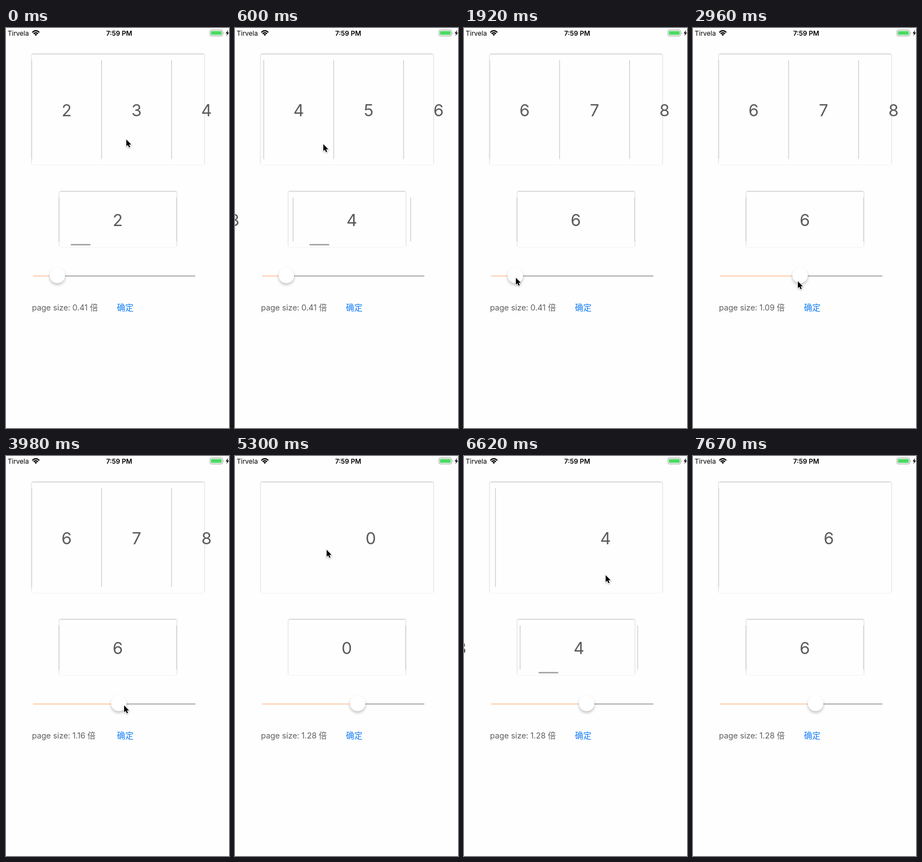
Write an HTML page that moves like this. It is 404x725 px and loops after 8.49 s.

```html
<!DOCTYPE html>
<html lang="zh">
<head>
<meta charset="utf-8">
<title>Page size</title>
<style>
html, body { margin: 0; width: 100%; height: 100%; overflow: hidden; background: #fefefe; }
#stage { position: relative; width: 404px; height: 725px; overflow: hidden; }
.box { position: absolute; background: #fefefe; border-radius: 2px; box-shadow: 0 -1px 3px rgba(0,0,0,.27); }
svg { position: absolute; left: 0; top: 0; font-family: Inter, "Noto Sans CJK SC", "Noto Sans CJK", sans-serif; }
.num { font-size: 30px; fill: #5a5a5a; text-anchor: middle; }
.sep { fill: #d2d2d2; }
.label { font-size: 14.6px; letter-spacing: -.13px; fill: #606060; }
.link { font-size: 15px; fill: #127cf5; }
.bar { font-size: 12px; }
#knob { filter: drop-shadow(0 3px 2.5px rgba(0,0,0,.24)); }
#cursor { filter: drop-shadow(0 1px 1px rgba(0,0,0,.3)); }
</style>
</head>
<body>
<div id="stage">
  <div class="box" style="left:47px;top:48px;width:312px;height:200px"></div>
  <div class="box" style="left:97px;top:297px;width:212px;height:100px"></div>
  <svg width="404" height="725" viewBox="0 0 404 725">
    <g class="bar">
      <text x="3" y="14">Tirvela</text>
      <text x="205" y="14" text-anchor="middle" font-weight="600">7:59 PM</text>
    </g>
    <path d="M47.6 7.9Q54 2 60.4 7.9M50 10.4Q54 6.7 58 10.4" fill="none" stroke="#000" stroke-width="2.1"/>
    <path d="M54 14.2L51.6 11.8Q54 9.8 56.4 11.8Z"/>
    <rect x="369.5" y="3.5" width="23" height="11" rx="2.6" fill="none" stroke="#a0a0a0"/>
    <rect x="371.2" y="5.4" width="19.6" height="7.2" rx="1.2" fill="#4cd964"/>
    <path d="M394 7.4Q396 9.2 394 11Z" fill="#a0a0a0"/>
    <path d="M402.4 3.6L398 9.8H400.6L399.4 14.6L404 8.2H401.2Z"/>
    <g id="pages"></g>
    <rect id="thumb" y="391.5" width="36" height="2.4" rx="1.2" fill="#a0a0a0"/>
    <g stroke-width="2">
      <path id="rest" stroke="#a9a9a9"/>
      <path id="done" stroke="#ffcdae"/>
    </g>
    <circle id="knob" cy="448.5" r="14" fill="#fff"/>
    <text class="label" x="47" y="511.5" id="label"></text>
    <text class="link" x="201" y="511.5">确定</text>
    <path id="cursor" d="M1 2V14.5L3.8 11.9L5.9 16.6L8 15.7L6 11.2H10Z" stroke="#fff" stroke-width="2" paint-order="stroke"/>
  </svg>
</div>
<script>
const LOOP = 8490, TICK = 147.1, PAGES = 20;
const RESET = 33; // tick at which the new page size is applied
const $ = id => document.getElementById(id);
const clamp = t => Math.min(1, Math.max(0, t));
const set = (el, attrs) => { for (const key in attrs) el.setAttribute(key, attrs[key]); };

// Equal swipes, one page each; every swipe lasts two ticks.
const rounds = [
  { page: 2, count: 4, first: .496, gap: 2.5, hide: 13 },
  { page: 0, count: 6, first: 37.5, gap: 2.13, hide: 52 }
];

function scrollAt(n) {
  const { page, count, first, gap, hide } = rounds[n < RESET ? 0 : 1];
  let pos = page, drag = 0;
  for (let i = 0; i < count; i++) {
    const t = clamp((n - first - i * gap) / 2);
    pos += 1 - (1 - t) ** 4.5;
    drag += Math.sin(Math.PI * t);
  }
  const shown = pos > 0 ? clamp((hide - n) / 2) : 0;
  return { pos, drag, shown };
}

const sizeAt = n => .41 + .68 * clamp((n - 15) / 5) ** .95 + .19 * clamp((n - 21) / 8) ** 3.5;

// Cursor stops: tick, x, y
const stops = [
  [0, 217, 200], [8, 191, 217], [12, 93, 450], [15, 93, 452], [20, 189, 457], [27, 213, 450],
  [29, 231, 450], [33, 213, 505], [36, 165, 168], [45, 300, 214], [49, 235, 230], [52, 230, 760]
];

function cursorAt(n) {
  const i = stops.findIndex(stop => stop[0] > n);
  if (i < 0) return stops[stops.length - 1].slice(1);
  const [t0, x0, y0] = stops[i - 1], [t1, x1, y1] = stops[i];
  const k = (n - t0) / (t1 - t0);
  return [x0 + (x1 - x0) * k, y0 + (y1 - y0) * k];
}

function add(tag, attrs, text = "") {
  const el = document.createElementNS("http://www.w3.org/2000/svg", tag);
  set(el, attrs);
  el.textContent = text;
  return $("pages").appendChild(el);
}

function strip(left, sepY, sepH, textY) {
  const items = Array.from({ length: PAGES }, (_, i) => ({
    sep: i && add("rect", { class: "sep", y: sepY, width: 1.5, height: sepH }),
    num: add("text", { class: "num", y: textY }, i)
  }));
  return (pos, width) => items.forEach(({ sep, num }, i) => {
    const x = left + (i - pos) * width;
    if (sep) set(sep, { x: x - .7 });
    set(num, { x: x + width / 2 });
  });
}

const upper = strip(46.5, 58.5, 179, 159.5);
const lower = strip(96, 307, 80, 358.5);

function draw(n) {
  const { pos, drag, shown } = scrollAt(n);
  const size = sizeAt(n), knob = 32.1 + 148.5 * size, [x, y] = cursorAt(n);
  upper(pos, n < RESET ? 126.7 : 399);
  lower(pos, 213);
  set($("thumb"), { x: 99.2 + pos * 9, opacity: shown });
  set($("knob"), { cx: knob });
  set($("done"), { d: `M49 449.5H${knob}` });
  set($("rest"), { d: `M${knob} 449.5H343` });
  set($("cursor"), { transform: `translate(${x - 45 * drag} ${y})` });
  $("label").textContent = `page size: ${size.toFixed(2)} 倍`;
}

const start = performance.now();
function frame() {
  draw(Math.floor((performance.now() - start) % LOOP / TICK));
  requestAnimationFrame(frame);
}
frame();
</script>
</body>
</html>
```
